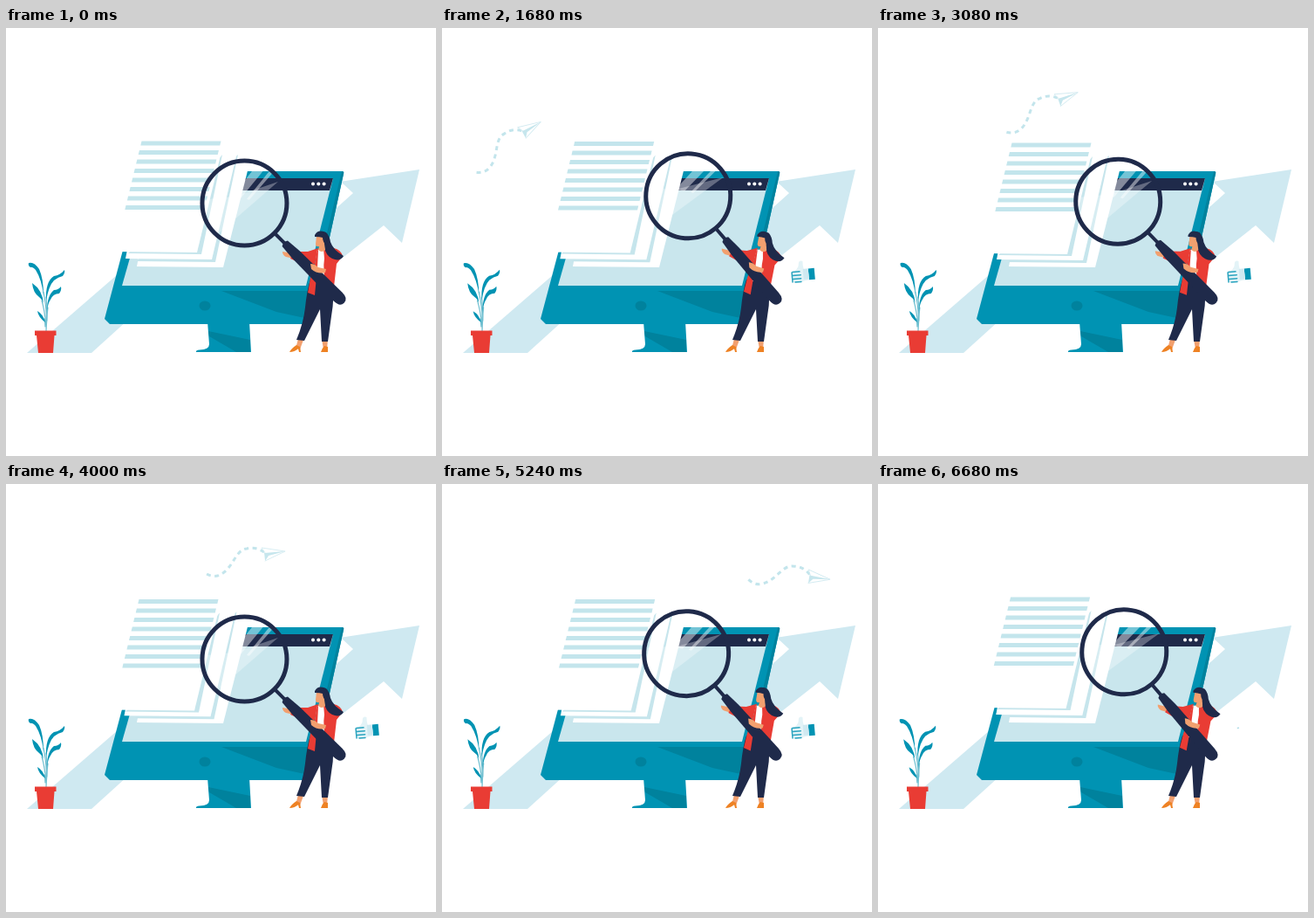
These frames come from a looping animation (493x490 px, 6720 ms). An HTML page:

```html
<!DOCTYPE html>
<html lang="en">
<head>
<meta charset="utf-8">
<title>Search illustration</title>
<style>
  html, body { margin: 0; width: 100%; height: 100%; overflow: hidden; background: #fff; }
  svg { display: block; width: 100vw; height: 100vh; }
  .teal { fill: #0093b3; }
  .deep { fill: #00829d; }
  .pale { fill: #cfe9f1; }
  .shade { fill: #c6e5ec; }
  .navy { fill: #1f2a4a; }
  .red { fill: #e93c34; }
  .skin { fill: #f2a06f; }
  .shoe { fill: #ee8224; }
  .white { fill: #fff; }
  .line { fill: none; stroke-linecap: round; stroke-linejoin: round; }
  .ink { stroke: #1f2a4a; }
</style>
</head>
<body>
<svg viewBox="0 0 493 490">
  <g id="arrow" class="pale">
    <path d="M24 372L135 276L150 325L98 372Z"/>
    <path d="M474 162L454 246L433 226L372 274L350 232L398 189L385 177L350 181Z"/>
  </g>

  <g id="monitor">
    <path class="teal" d="M231 336H279L281 371H218Q217 369 222 368.500Q233 368 233 362Z"/>
    <path class="deep" d="M232 347L280 357V371H264L233 353Z"/>
    <path class="teal" d="M162 164H385Q388 164 387 167L350 335Q349 339 345 339H119L113 333L157 168Q158 164 162 164Z"/>
    <path class="deep" d="M385 164Q388 164 387 167L350 335Q349 339 345 339H343Z"/>
    <path d="M168 172H375L344 295H133Z" fill="#c9e6ed"/>
    <path class="navy" d="M168 172H375L371 186H164Z"/>
    <g class="white"><circle cx="352" cy="178.5" r="2"/><circle cx="358.3" cy="178.5" r="2"/><circle cx="364.6" cy="178.5" r="2"/></g>
    <path class="deep" d="M247 301H354L347 333L310 325Z"/>
    <ellipse class="deep" cx="228" cy="318" rx="6.5" ry="5.5"/>
  </g>

  <path class="white" d="M176 134L284 136L249 274L150 273Z"/>
  <g id="midSheet">
    <path class="shade" d="M266 145L240 268L150 267L200 200Z"/>
    <path class="white" d="M164 128L268 130L236 265L137 264Z"/>
  </g>
  <g id="frontSheet">
    <path class="shade" d="M248 145L224 259L140 258L200 200Z"/>
    <path class="white" d="M151 119L252 121L219 257L123 256Z"/>
    <g id="rows" fill="#c3e5ec"></g>
  </g>

  <g id="plane">
    <path class="line" d="M-75 24Q-66 29-58 24C-44 16-42-4-29-5Q-18-8-8 0" stroke="#c3e5ec" stroke-width="3" stroke-dasharray="5 4.5" style="stroke-linecap:butt"/>
    <path class="white" d="M15-2L-12-7L-8 0L-20 11Z"/>
    <path d="M15-2L-9 0L-8 9L-4 3Z" fill="#c6e6ed"/>
    <path class="line" d="M-8 0L-12-6L15-2L-8 9" stroke="#d3ebf1" stroke-width=".9"/>
  </g>

  <g id="thumb">
    <path d="M420 276H427V289H420Z" class="teal"/>
    <path d="M420 276L415 276Q414 272 414.500 267Q410 265 409.500 270Q409.500 274 405 277H402Q400 278 401 281Q399 284 401.500 286Q401 291 405 291L420 289Z" fill="#e3f3f7"/>
    <path class="line" d="M402 278.500H410M401.500 282.500H411M402 286.500H411M404 290.300H411M401 279V290" stroke="#2aa4bf" stroke-width="1.5"/>
    <path d="M414 276H420V288H414Z" class="pale"/>
  </g>

  <g id="plant">
    <g id="leaves" class="teal">
      <path class="line" d="M46 347Q48 328 43 302M46 345Q48 325 46 308M46 340Q44 322 41 312M47 335Q47 327 48 320M45 342Q45 337 44 333" stroke="#6fbfd0" stroke-width="1.2"/>
      <path d="M43 306Q41 288 34 277Q30 273 28 274Q25 272 26 269Q32 267 38 276Q43 287 43 306Z"/>
      <path d="M43 316Q42 300 30 292Q31 303 38 308Q42 311 43 316Z"/>
      <path d="M46 312Q45 290 55 284Q62 283 67 277Q68 280 65 284Q60 285 55 289Q49 295 46 312Z"/>
      <path d="M47 324Q47 306 55 300Q60 300 63 296Q64 300 61 304Q54 304 51 311Q48 315 47 324Z"/>
      <path d="M45 337Q43 328 36 324Q37 331 45 337Z"/>
    </g>
    <path class="red" d="M33 346.500H57.500V352H55.500L54 372H37L35 352H33Z"/>
  </g>

  <g id="woman">
    <path class="skin" d="M335 356L332 367L337 368L341 357ZM362 356L364 368H368L369 356Z"/>
    <path class="shoe" d="M325 371Q327 367 333 363L337 365L338 371H336L335 367Q331 371 325 371ZM361 371Q362 367 365 364L369 365V371Z"/>
    <path class="navy" d="M349 288H374Q377 308 373 330L369 359H362L360 322L342 358L333 357Q341 338 343 320Q345 300 349 288Z"/>
    <g id="torso">
      <path class="skin" d="M317 256Q317 260 321 262L330 264L333 259L323 257Z"/>
      <path class="red" d="M358 252L346 256L330 256L326 264L348 274L354 270Z"/>
      <path class="white" d="M357 254L367 253L371 288L351 291Z"/>
      <path class="red" d="M357 253L354 270L349 286L346 303L354 306L357 274L358 255Z"/>
      <path class="red" d="M364 252L376 252Q384 254 386 261L379 270L376 296L367 298Q363 276 365 264Z"/>
      <g id="head">
        <path class="navy" d="M356 236Q360 231 367 234Q371 238 372 245Q375 254 387 261Q383 268 374 264Q366 260 365 250Z"/>
        <path class="skin" d="M356 238Q360 235 365 238V247L366 254Q362 258 358 254L359 250Q355 251 355 247Z"/>
        <path class="navy" d="M354 237Q358 230 366 234Q370 238 367 248Q363 245 363 240Q360 239 354 239Z"/>
      </g>
    </g>
    <g id="lens">
      <g class="white" transform="translate(0 -154) rotate(42)">
        <path d="M18-44L27-39L-4-5L-14-7Z" opacity=".45"/>
        <path d="M31-35L34-32L6-3L3-4Z" opacity=".45"/>
        <path d="M40-22L-32 34Q-47 15-46-6L-10-8Z" opacity=".3"/>
      </g>
      <circle class="line ink" cy="-153.500" r="48.500" stroke-width="5"/>
      <path class="line ink" d="M0-105V-86" stroke-width="4"/>
      <path class="navy" d="M-4.500-88Q0-91 4.500-88L6-70L7-2Q7 8 0 8Q-7 8-7-2L-6-70Z"/>
    </g>
    <path id="hand" class="skin" d="M349 270Q354 270 358 274L367 276L366 280Q357 282 350 276Z"/>
  </g>
</svg>
<script>
const LOOP = 6720;
const part = id => document.getElementById(id);
const place = (id, transform) => part(id).setAttribute('transform', transform);
const clamp = v => Math.min(1, Math.max(0, v));
const smooth = v => { v = clamp(v); return v * v * (3 - 2 * v); };

// Smooth curve through [time, value, value, ...] keys.
function track(keys) {
  const slope = (i, c) => {
    const a = keys[Math.max(0, i - 1)], b = keys[Math.min(keys.length - 1, i + 1)];
    return (b[c] - a[c]) / (b[0] - a[0]);
  };
  return t => {
    let i = 0;
    while (i < keys.length - 2 && t > keys[i + 1][0]) i++;
    const a = keys[i], b = keys[i + 1], span = b[0] - a[0];
    const u = clamp((t - a[0]) / span), v = 1 - u;
    return a.slice(1).map((p, k) => {
      const c = k + 1;
      return v * v * (1 + 2 * u) * p + u * u * (3 - 2 * u) * b[c]
        + span * u * v * (v * slope(i, c) - u * slope(i + 1, c));
    });
  };
}

const flight = track([
  [200, -22, 190, -30], [960, 42, 142, -25], [2400, 158, 93, -18.8], [3080, 215, 79, -13],
  [4000, 305, 79, 0], [5240, 430, 107, 16], [6680, 578, 172, 26]
]);
const drift = track([
  [0, 0, 0], [960, -2, -2], [2400, -4, 3], [3080, -2, 2],
  [4000, -3, 2.5], [5240, -2.3, 2.5], [6720, -3.5, 0]
]);

part('rows').innerHTML = Array.from({ length: 8 }, (_, i) => {
  const x = 155.5 - i * 2.57, y = 129.5 + i * 10.5;
  return `<path d="M${x} ${y}h91l-1.2 5h-91z"/>`;
}).join('');

function draw(t) {
  const swing = Math.abs(Math.sin(Math.PI * t / 1000)) ** 1.3;
  const lean = 5.6 * swing;
  place('lens', `translate(382 309) rotate(${lean - 45})`);
  place('torso', `rotate(${lean} 362 302)`);
  place('hand', `rotate(${lean} 374 305)`);
  place('head', `translate(${3 * swing} 0)`);
  place('leaves', `rotate(${-swing} 45 347)`);

  const [dx, dy] = drift(t);
  place('frontSheet', `translate(${dx} ${dy})`);
  place('midSheet', `translate(${dx * .5} ${dy * .5})`);

  const [x, y, angle] = flight(t);
  place('plane', `translate(${x} ${y}) rotate(${angle})`);

  const size = smooth((t - 400) / 400) * smooth((LOOP + 20 - t) / 360);
  place('thumb', `translate(413 279) rotate(-5) scale(${size}) translate(-413 -279)`);
}

const start = performance.now();
function tick() {
  draw((performance.now() - start) % LOOP);
  requestAnimationFrame(tick);
}
draw(0);
requestAnimationFrame(tick);
</script>
</body>
</html>
```
